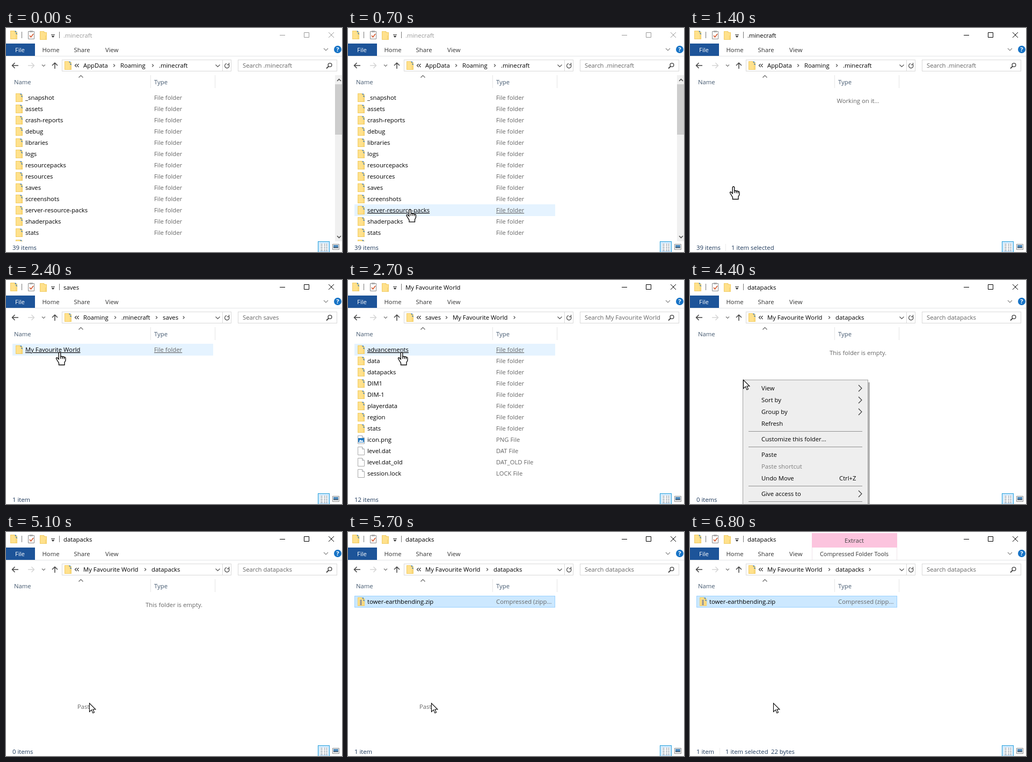
Write an HTML page that moves like this. It is 626 px wide and 418 px high and loops after 7.2 s.

```html
<!DOCTYPE html>
<html lang="en">
<head>
<meta charset="utf-8">
<title>Installing a data pack</title>
<style>
html, body { margin: 0; width: 100%; height: 100%; overflow: hidden; background: #fff; }
svg { display: block; font: 11.3px "Open Sans", "Noto Sans", sans-serif; }
</style>
</head>
<body>
<svg id="stage" width="626" height="418" viewBox="0 0 626 418"></svg>
<script>
const LOOP = 7200, STEP = 100;
const GRAY = '#666', NAVY = '#1e395b', HEAD = '#43586f';

const text = (x, y, s, fill = '#000', attrs = '') =>
  `<text x="${x}" y="${y}" fill="${fill}" ${attrs}>${s}</text>`;
const rect = (x, y, w, h, fill, stroke = 'none') =>
  `<rect x="${x}" y="${y}" width="${w}" height="${h}" fill="${fill}" stroke="${stroke}"/>`;
const line = (d, stroke, width = 1, fill = 'none', attrs = '') =>
  `<path d="${d}" stroke="${stroke}" stroke-width="${width}" fill="${fill}" ${attrs}/>`;
const shape = (d, fill) => `<path d="${d}" fill="${fill}"/>`;
const at = (x, y, s) => `<g transform="translate(${x} ${y})">${s}</g>`;
const centred = 'text-anchor="middle"';

// Icons
const arrows = shape('M8 .5h3v3zM13.5 6.5h-3v-3z', '#2f74b5');
const plainFolder = shape('M0 0h8l1 2h4v14H0z', '#f1cb62') + shape('M1 1h6l1 2h4v12H1z', '#ffe18c') +
  line('M10.5 8v7', '#f4cf6a');
const folder = plainFolder + arrows;
const zip = folder + line('M6 4v11', '#6b6b6b', 3) + line('M6 4v11', '#f2f2f2', 1.5, 'none', 'stroke-dasharray="1 1"');
const page = line('M.5.5h8l4 4v11h-12z', '#a8a8a8', 1, '#fff') + line('M8.5.5v4h4', '#a8a8a8', 1, '#e8eef4');
const image = page + rect(1, 5, 11, 8, '#1e79c4') + shape('M2 12l3-4 2 2 2-1 2 3z', '#fff');

const dirs = s => s.split(' ').map(n => [n, 'File folder', folder]);
const home = dirs('_snapshot assets crash-reports debug libraries logs resourcepacks resources saves screenshots server-resource-packs shaderpacks stats').concat([['', '', folder]]);
const world = dirs('advancements data datapacks DIM1 DIM-1 playerdata region stats').concat([
  ['icon.png', 'PNG File', image], ['level.dat', 'DAT File', page],
  ['level.dat_old', 'DAT_OLD File', page], ['session.lock', 'LOCK File', page]]);
const pack = [['tower-earthbending.zip', 'Compressed (zipp...', zip]];

const NAME = 'My Favourite World';
const homePath = [[144, 'AppData'], [213, 'Roaming'], [285, '.minecraft']];
const packPath = [[144, NAME], [271, 'datapacks']];

// Each view: start time, title, path, x of the closing chevron, rows, status, picked row and its time, message
const views = [
  { from: 0, title: '.minecraft', path: homePath, rows: home, status: '39 items', pick: 8, pickAt: 1100 },
  { from: 1300, title: '.minecraft', path: homePath, rows: [], status: '39 items', pickAt: 0, note: 'Working on it...' },
  { from: 1600, title: 'saves', path: [[144, 'Roaming'], [215, '.minecraft'], [292, 'saves']], tail: 331,
    rows: [[NAME, 'File folder', folder]], status: '1 item', pick: 0, pickAt: 2500 },
  { from: 2700, title: NAME, path: [[144, 'saves'], [195, NAME]], tail: 310, rows: world, status: '12 items', pick: 2, pickAt: 3500 },
  { from: 3700, title: 'datapacks', path: packPath, rows: [], status: '0 items', note: 'This folder is empty.' },
  { from: 5300, title: 'datapacks', path: packPath, rows: pack, status: '1 item', pick: 0, pickAt: 5300 },
  { from: 5900, title: 'datapacks', path: packPath, tail: 335, rows: pack, status: '1 item', pick: 0, pickAt: 5900, extract: true }
];

// Pointer stops: time, x, y
const stops = [[200, 190, 430], [1000, 81, 296], [1600, 81, 296], [2300, 100, 135], [2700, 100, 135],
  [3300, 83, 170], [3800, 83, 170], [4100, 99, 186], [4500, 99, 186], [4900, 155, 319], [LOOP, 155, 319]];

function pointer(t) {
  const i = stops.findIndex(s => s[0] > t);
  if (i < 1) return [190, 430];
  const [t0, x0, y0] = stops[i - 1], [t1, x1, y1] = stops[i];
  const u = (t - t0) / (t1 - t0), k = u * u * (3 - 2 * u);
  return [x0 + (x1 - x0) * k, y0 + (y1 - y0) * k];
}

const chevron = (x, y, color = '#555', r = 2.5) => line(`M${x - r / 2} ${y - r}l${r} ${r}l${-r} ${r}`, color, 1.2);
const caret = (x, y, color, r = 4, up = 1) => line(`M${x - r} ${y + up * r / 2}l${r} ${-up * r}l${r} ${up * r}`, color, 1.2);

function titleBar(v, active) {
  const ink = active ? '#000' : '#999';
  let s = at(8, 5, folder) + line('M29.5 7v12M99.5 7v12', '#777') +
    line('M41.5 6.5h11v14h-11z', '#8a8a8a', 1, '#fff') + rect(44, 5, 6, 3, '#aaa') + line('M44 14l2.5 3 4.5-6', '#d2562c', 1.6) +
    at(63, 6, plainFolder) + line('M84 12.5h7', '#333') + shape('M84.5 14.5h6l-3 3.5z', '#333') +
    text(107, 18, v.title, ink) +
    line('M510 13.5h10M555.5 8.5h9v9h-9zM601 8l10 10M611 8l-10 10', ink);
  if (v.extract) s += rect(227, 2, 159, 27, '#fcc4de') + line('M227.5 29v23M385.5 29v23', '#f0e4ea') +
    text(306, 20, 'Extract', '#444', centred) +
    text(306, 45, 'Compressed Folder Tools', '#333', centred + ' font-size="10.9"');
  return s;
}

function toolbar(v) {
  const tabs = [[67.5, 'Home'], [126.5, 'Share'], [185, 'View']];
  let s = rect(0, 29, 54, 23, '#1d5499') + text(26, 45, 'File', '#fff', centred) +
    tabs.map(([x, n]) => text(x, 45, n, '#333')).join('') +
    line('M0 52.5h626', '#e3e4e6') + caret(596, 40, '#8a8a8a', 4, -1) +
    '<circle cx="618" cy="40" r="7" fill="#1673c6"/>' + text(618, 44, '?', '#fff', centred + ' font-weight="700"') +
    line('M23 70H12M16.5 65l-5 5 5 5', '#444', 1.5) + line('M41 70h11M47.5 65l5 5-5 5', '#d5d5d5', 1.5) +
    caret(70, 70, '#777', 3, -1) + line('M91 76V65M86 70l5-5 5 5', '#444', 1.5) +
    rect(104.5, 59.5, 315, 21, '#fff', '#d9d9d9') + line('M403.5 60v20', '#d9d9d9') +
    at(109, 62, folder) + line('M131.5 67l-3 3 3 3M135.5 67l-3 3 3 3', '#333', 1.2) +
    caret(394.5, 70.5, '#555', 4, -1) +
    line('M415.3 68.3A4.2 4.2 0 1 1 411 66.4M415.5 65v3.5H412', '#555', 1.3) +
    rect(432.5, 59.5, 184, 21, '#fff', '#d9d9d9') + text(441, 74, 'Search ' + v.title, GRAY) +
    '<circle cx="603.5" cy="69" r="3.4" fill="none" stroke="#444" stroke-width="1.4"/>' + line('M601 71.5l-4 4', '#444', 1.8);
  v.path.forEach(([x, n], i) => { s += (i ? chevron(x - 11.5, 70) : '') + text(x, 74, n); });
  return s + (v.tail ? chevron(v.tail, 70) : '');
}

function list(v, t, hover) {
  let s = text(15, 105, 'Name', HEAD) + text(276, 105, 'Type', HEAD) +
    caret(139.5, 90.5, '#666') + line('M269.5 88v24M389.5 88v24', '#e5e5e5');
  if (v.note) s += text(313, 140, v.note, GRAY, centred);
  v.rows.forEach(([name, type, icon], i) => {
    const y = 130 + 21 * i, picked = i === v.pick && t >= v.pickAt;
    const under = i === hover ? 'text-decoration="underline"' : '';
    if (picked) s += rect(12.5, y - 10.5, 373, 21, '#cce8ff', '#99d1ff');
    else if (i === hover) s += rect(12, y - 11, 374, 22, '#e5f3ff');
    s += at(18, y - 8, icon) + text(36, y + 4, name, '#000', under) + text(276, y + 4, type, GRAY, under);
  });
  if (v.rows === home) s += rect(613, 88, 13, 310, '#f0f0f0') + rect(613, 105, 13, 94, '#cdcdcd') +
    line('M617 99l3.5-3.5 3.5 3.5M617 388l3.5 3.5 3.5-3.5', '#505050', 1.6);
  return s;
}

function statusBar(v, t) {
  const x = v.status.length > 6 ? 77 : 66;
  let s = rect(0, 398, 626, 20, '#fff') + text(12, 414, v.status, NAVY);
  if (t >= v.pickAt && (v.extract || v.from < 5000)) s += line(`M${x - 10.5} 403v13`, '#ececec') + text(x, 414, '1 item selected', NAVY);
  if (v.extract) s += text(151, 414, '22 bytes', NAVY);
  s += rect(581.5, 398.5, 21, 22, '#cce8ff', '#26a0da') + rect(585, 402, 15, 14, '#fff');
  for (let y = 403.5; y < 416; y += 3) s += line(`M586 ${y}h4M592 ${y}h3M596 ${y}h3`, '#6f8191');
  return s + line('M608.5 403.5h12v10h-12z', '#8a8a8a', 1, '#fff') + rect(610, 405, 9, 6, '#4a86b8') + rect(610, 409, 9, 2, '#5b6b7b');
}

const entries = [[202, 'View', 1], [224, 'Sort by', 1], [246, 'Group by', 1], [268, 'Refresh'],
  [297, 'Customize this folder...'], [326, 'Paste'], [348, 'Paste shortcut'], [370, 'Undo Move'], [399, 'Give access to', 1]];

function menu(x, y) {
  let s = '<g opacity=".4">' + rect(331, 191, 4, 227, '#444') + '</g>' + rect(98.5, 186.5, 233, 240, '#eee', '#a0a0a0');
  for (const [cy, name, sub] of entries) {
    if (x > 101 && Math.abs(y - cy) <= 11) s += rect(101, cy - 11, 227, 22, '#fff');
    s += text(133, cy + 4, name, name === 'Paste shortcut' ? '#7d7d7d' : '#000');
    if (sub) s += line(`M314 ${cy - 6}l6 6-6 6`, '#333', 1.1);
  }
  return s + text(278, 374, 'Ctrl+Z') + line('M109 282.5h212M109 311.5h212M109 384.5h212M109 413.5h212', '#919191');
}

const arrowCursor = line('M.5.5v16l3.8-3.6 2.6 6 2.6-1.1-2.6-5.8h5z', '#000', 1.1, '#fff');
const handCursor = line('M-1.8 1.8a1.8 1.8 0 0 1 3.6 0V8q2-1.2 3.4.4 1.8-1 3.2.6 2.6-.6 2.6 2V15l-2 4v4.5h-10.5V20l-4.5-7.5q-1.5-3 1.5-2.5l2.7 2.8zM1.8 8v4M5.2 8.4v3.8M8.4 9v3.4', '#000', 1.3, '#fff');

function scene(t) {
  const v = views.filter(w => w.from <= t).pop();
  const [x, y] = pointer(t);
  const row = Math.floor((y - 119) / 21);
  const hover = x < 386 && y < 398 && v.rows[row] ? row : -1;
  let s = titleBar(v, t >= 1100) + toolbar(v) + list(v, t, hover) + statusBar(v, t);
  if (t >= 4200 && t < 5100) s += menu(x, y);
  if (t >= 5100 && t < 5800) s += text(133, 330, 'Paste', '#000', 'opacity=".6"');
  const hand = hover >= 0 || v.note === 'Working on it...';
  return s + at(x, y, hand ? handCursor : arrowCursor);
}

const stage = document.getElementById('stage');
let shown = -1;
function frame() {
  const t = Math.floor(performance.now() % LOOP / STEP) * STEP;
  if (t !== shown) stage.innerHTML = scene(shown = t);
  requestAnimationFrame(frame);
}
frame();
</script>
</body>
</html>
```
